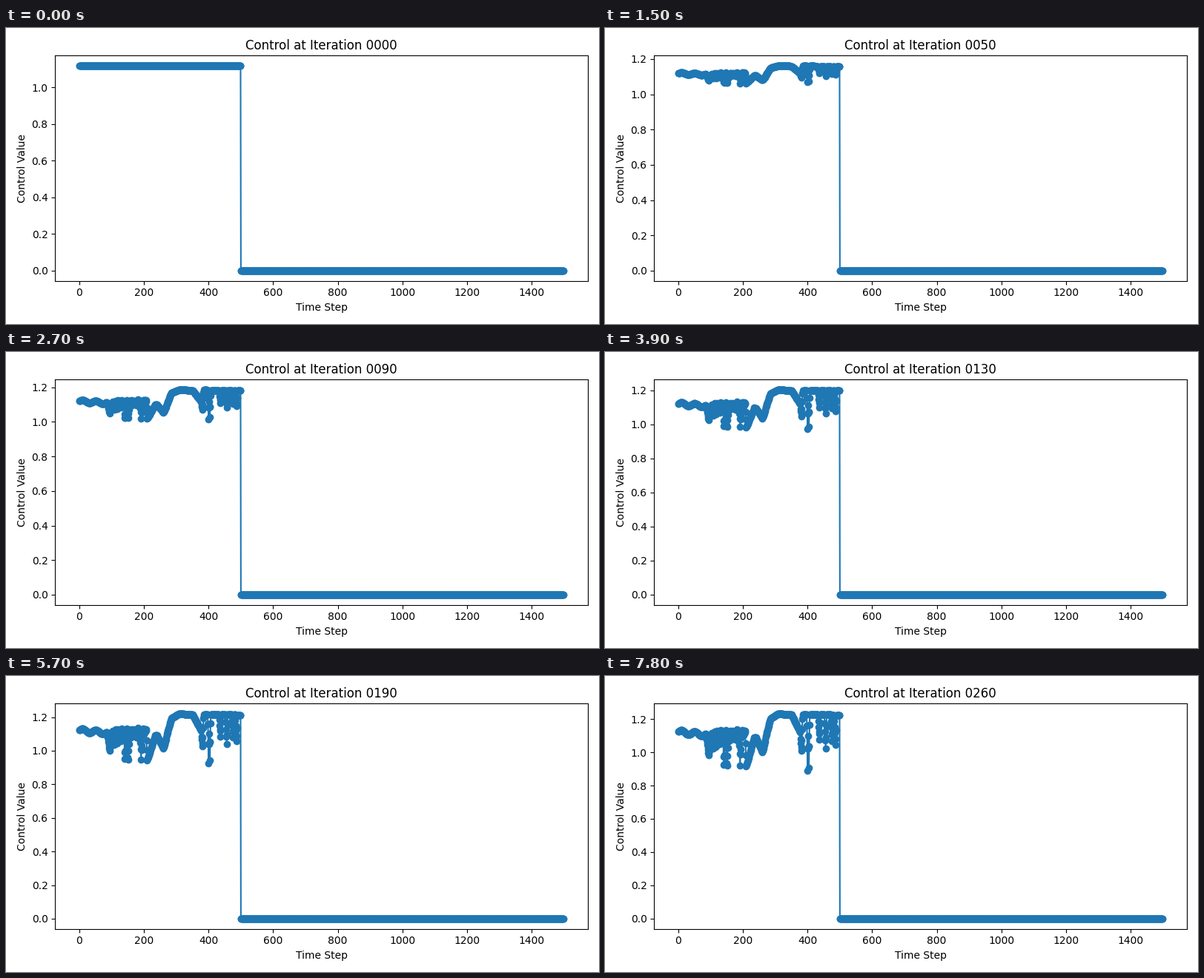
A matplotlib script for the animation above (8000 ms loop, 800 by 400 pixels).

```python
import numpy as np
import matplotlib.pyplot as plt
from matplotlib.animation import FuncAnimation

STEPS, ACTIVE = 1500, 500
START = 1.1168
INTERVAL, FRAMES, HOLD = 100, 80, 3
TAU, LAST = 117, 260
DIP_POWER = 1.4  # dips deepen later than the slow trend

rng = np.random.default_rng(4)
x = np.arange(STEPS)
active = x[:ACTIVE]


def dip(center, left, right, depth):
    offset = active - center
    width = np.where(offset < 0, left, right)
    return depth * np.clip(1 - np.abs(offset) / width, 0, 1)


# Slow drift: a flat start, a valley, then a plateau with one notch
trend = np.interp(active,
                  [0, 85, 130, 200, 237, 268, 285, 308, 350, 378, 386, 499],
                  [.006, -.01, .01, .01, -.028, -.04, .085, .114, .11, 0, .112, .107])
trend += np.where(active < 85, .012 * np.sin(active / 6.5), 0)
rough = (active > 100) & (active < 207)
trend += rng.uniform(-.03, .012, ACTIVE) * rough

# Main dips, then two runs of evenly spaced small ones
dips = (dip(94, 8, 9, .13) + dip(141, 3, 4, .2) + dip(151, 3, 4, .17)
        + dip(191, 4, 4, .18) + dip(210, 3, 25, .2) + dip(260, 20, 10, .08)
        + dip(381, 4, 3, .15) + dip(400, 2.5, 2.5, .34)
        + dip(404, 2.5, 2.5, .32) + dip(487, 5, 2, .18))
for center in range(108, 190, 7):
    dips += dip(center, 3, 3, rng.uniform(.03, .1))
for center in range(436, 480, 20):
    dips += dip(center, 4, 3, rng.uniform(.15, .23))


def control(iteration):
    growth = (1 - np.exp(-iteration / TAU)) / (1 - np.exp(-LAST / TAU))
    values = np.zeros(STEPS)
    values[:ACTIVE] = START + growth * trend - growth ** DIP_POWER * dips
    return values


fig, ax = plt.subplots(figsize=(8, 4), dpi=100)
line, = ax.plot(x, control(0), marker="o", color="#1f77b4")
title = ax.set_title("Control at Iteration 0000")
ax.set_xlabel("Time Step")
ax.set_ylabel("Control Value")
fig.tight_layout()


def update(frame):
    iteration = frame // HOLD * 10
    values = control(iteration)
    line.set_ydata(values)
    margin = .05 * values.max()
    ax.set_ylim(-margin, values.max() + margin)
    title.set_text(f"Control at Iteration {iteration:04d}")
    return line, title


anim = FuncAnimation(fig, update, frames=FRAMES, interval=INTERVAL,
                     repeat=True, repeat_delay=0)
plt.show()
```
